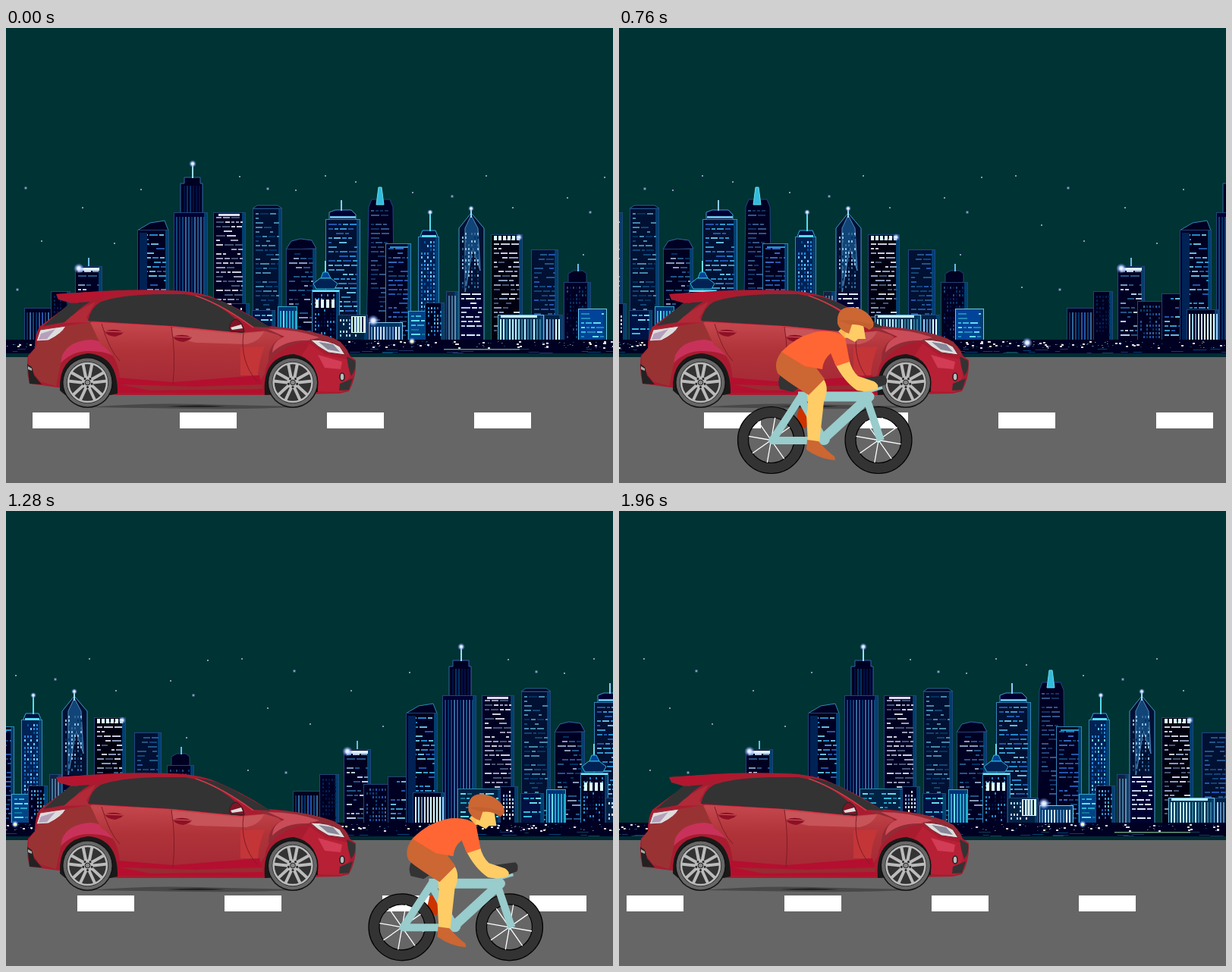
Recreate the animation shown at these times as an HTML page with a canvas. Size 800x600 px, loop 2000 ms.

```html
<!DOCTYPE html>
<html lang="en">
<head>
<meta charset="utf-8">
<title>Night ride</title>
<style>
html, body { margin: 0; width: 100%; height: 100%; overflow: hidden; background: #033; }
canvas, svg { position: absolute; left: 0; top: 0; width: 800px; height: 600px; display: block; }
svg { overflow: hidden; }
</style>
</head>
<body>
<canvas id="scene" width="800" height="600"></canvas>
<svg viewBox="0 0 800 600">
  <defs>
    <g id="rim">
      <circle r="33.5" fill="#111"/>
      <circle r="32" fill="#666"/>
      <circle r="27.5" fill="#222"/>
      <circle r="25.5" fill="#333" stroke="#bbb" stroke-width="2.5"/>
      <g id="spokes" stroke="#bbb" stroke-width="4"></g>
      <circle r="8" fill="#bbb"/>
      <g id="nuts" fill="#222"></g>
      <circle r="3.4" fill="#888" stroke="#222"/>
    </g>
    <g id="tyre">
      <circle r="37" fill="none" stroke="#333" stroke-width="14"/>
      <circle r="44" fill="none" stroke="#000" stroke-width="1.2"/>
      <circle r="30" fill="none" stroke="#000" stroke-width="1.2"/>
      <g class="wires" stroke="#fff" stroke-width="1.3"></g>
      <circle r="3" fill="#dff"/>
    </g>
    <linearGradient id="side" x1="0" y1="0" x2="0" y2="1">
      <stop offset="0" stop-color="#c4484d"/>
      <stop offset=".45" stop-color="#b03339"/>
      <stop offset="1" stop-color="#a52a36"/>
    </linearGradient>
  </defs>

  <g id="car">
    <path fill="#484848" d="M112 500Q180 494 255 496T392 499Q330 503 250 502T112 500Z"/>
    <path fill="#222" d="M212 499Q250 496 290 499Q250 501 212 499Z"/>
    <path fill="#a91c30" d="M66 351L110 348Q165 344 215 346Q245 346 270 354Q310 370 345 393Q395 396 432 409Q449 418 453 432L461 438Q462 462 452 479L440 482L340 484H147L76 475L31 469Q26 451 29 432L38 422Q38 404 44 394Q65 378 86 363L69 358Z"/>
    <path fill="#993333" d="M46 396L78 393L110 388L134 392L126 412Q90 414 73 438L66 472L45 466L30 446V433L40 420Z"/>
    <path fill="#c8325a" d="M74 432Q83 412 113 411Q142 415 151 440L147 437Q137 426 109 426Q87 426 72 442Z"/>
    <path fill="#333" d="M49 393L84 363L111 361Q94 370 82 387Z"/>
    <path fill="#b02a38" d="M76 389Q93 372 118 361L106 382L111 388Z"/>
    <path fill="url(#side)" d="M111 388L200 393L310 402L345 399Q372 407 365 423Q344 432 341 456L331 470L150 466Q150 432 125 418Z"/>
    <path fill="#c65458" d="M218 395L310 403L340 400Q335 413 317 417L250 415L220 408Z"/>
    <path fill="#c43538" d="M309 421L341 420Q333 440 332 458H309Z"/>
    <path fill="#b40f2f" d="M147 461L220 467L334 458L340 482L147 481Z"/>
    <path fill="#992b33" d="M150 470L250 473L338 470V476L190 478Z"/>
    <path fill="#333" d="M108 386Q112 368 125 361Q150 352 200 351H236Q258 354 272 363Q294 374 309 390L312 402L220 393Z"/>
    <path fill="#333" d="M250 352Q275 354 300 368L349 395L327 394Q285 367 250 354Z"/>
    <path fill="none" stroke="#d43a4a" stroke-width="1.5" d="M250 353Q285 365 326 395M113 388L220 394L310 403"/>
    <path fill="#b5152f" d="M66 351L112 348L160 347L115 357L92 363Z"/>
    <path fill="none" stroke="#811b28" stroke-width="1" d="M218 394Q224 430 220 470M126 390Q136 425 150 439M313 402Q308 440 331 466"/>
    <path fill="#922b36" d="M326 395L366 396Q413 399 441 414L452 430L424 428L400 413Q363 417 346 442Q344 416 366 407Z"/>
    <path fill="#ca4c58" d="M345 397Q382 397 413 408L398 412Q367 411 351 428Q352 412 367 407Z"/>
    <path fill="#b82036" d="M400 416L421 431L450 437L453 459L443 480L411 479Q411 444 390 432Z"/>
    <path fill="#d23c55" d="M411 431L443 440L441 450L420 448Z"/>
    <path fill="#ddd" stroke="#811b28" d="M401 411Q426 411 440 420L447 431L425 428Q411 421 401 411Z"/>
    <path fill="#889" d="M412 414L431 417L440 427L424 424Z"/>
    <path fill="#333" d="M449 433L460 439Q462 450 455 459L451 446Z"/>
    <path fill="#333" d="M440 469L457 462L452 477L439 478Z"/>
    <ellipse cx="443" cy="460" rx="3" ry="5" fill="#bbb" stroke="#222" stroke-width="1.5"/>
    <path fill="#ddd" stroke="#9b2436" d="M40 413L45 398L79 393Q74 403 56 412Z"/>
    <path fill="#b5a0bb" d="M46 403L65 397L54 410L43 411Z"/>
    <path fill="#222" d="M28 443L34 447L37 458L47 470L31 469Z"/>
    <path fill="#aaa" d="M29 446L34 449V452L29 450Z"/>
    <g fill="#8d1025">
      <path id="handle" d="M130 400Q143 395 155 401L152 404L144 407Q133 406 130 400Z"/>
      <use href="#handle" x="90" y="7"/>
    </g>
    <path stroke="#d45a60" d="M131 400L154 401M221 407L244 408"/>
    <path fill="#801425" stroke="#222" d="M294 396Q296 384 304 384Q313 389 314 401L296 400Z"/>
    <path fill="#ddd" d="M296 395L310 391L312 396L298 398Z"/>
    <path fill="#191919" d="M71 478Q69 433 108 429Q148 432 147 482L138 484H78Z"/>
    <path fill="#191919" d="M341 484Q337 433 379 430Q414 436 411 480Z"/>
    <use href="#rim" x="107.5" y="467.5"/>
    <use href="#rim" x="378" y="467.5"/>
  </g>

  <g id="bike">
    <path fill="#cc3300" d="M237 502L246 500L251 514L246 528L232 524Z"/>
    <use href="#tyre" x="200.5" y="543.5"/>
    <use href="#tyre" x="342" y="543.5"/>
    <g fill="none" stroke="#99cccc" stroke-linejoin="round">
      <path stroke-width="13" d="M236 486H330L270 541"/>
      <path stroke-width="10" d="M241 484L202 544H274M238 486L270 543M324 482L345 544"/>
      <path stroke-width="4" d="M320 482L347 474"/>
    </g>
    <circle cx="270" cy="542" r="8" fill="#99cccc"/>
    <path fill="#333" d="M213 457L234 461L238 474L229 480L212 476Q208 466 213 457Z"/>
    <path fill="#333" d="M320 462L350 458Q355 462 352 470L341 474L318 471Z"/>
    <path fill="#ffcc66" d="M247 479L269 462Q278 474 270 493L264 547H249L247 510Q251 497 247 479Z"/>
    <path fill="#cc6633" d="M248 543L263 545Q274 558 284 565L285 570Q265 569 247 556Z"/>
    <path fill="#cc6633" d="M214 427Q203 442 209 455Q215 462 250 484L271 463L262 451L250 434Z"/>
    <path fill="#ffcc66" d="M284 441L303 437Q307 452 315 459L336 466Q343 470 341 476Q329 481 314 478Q296 466 284 441Z"/>
    <path fill="#ff6633" d="M214 427Q235 405 264 400Q286 398 298 408L304 440L286 446L279 429Q269 437 268 450L245 446Z"/>
    <path fill="#ffbb55" d="M289 400L301 389L313 405L298 409Z"/>
    <path fill="#ffcc66" d="M300 391L322 391L325 410L315 410L311 414L298 407Z"/>
    <path fill="#cc6633" d="M288 390Q286 369 304 368Q321 368 331 380Q337 388 335 394L330 398Q320 390 307 391L303 403Q291 399 288 390Z"/>
    <path fill="#b95a2c" d="M289 386Q306 383 334 391L330 398Q318 389 304 391Z" opacity=".45"/>
  </g>
</svg>
<script>
const LOOP = 2000, STEP = 40;
const TILE = 877, SCROLL = 0.4087;
const ctx = document.getElementById('scene').getContext('2d');
const bike = document.getElementById('bike');

const rays = (n, start, make) =>
  Array.from({ length: n }, (_, i) => make(start + i * 360 / n)).join('');

document.getElementById('spokes').innerHTML = rays(5, 0, a =>
  `<path transform="rotate(${a})" d="M-2-5L-6-25M2-5L6-25"/>`);
document.getElementById('nuts').innerHTML = rays(5, 36, a =>
  `<circle transform="rotate(${a})" cy="-6" r="1.5"/>`);
document.querySelector('.wires').innerHTML = rays(8, 10, a =>
  `<path transform="rotate(${a})" d="M0 0V-30"/>`);

let seed = 7;
function rnd() {
  seed = (seed * 16807) % 2147483647;
  return seed / 2147483647;
}
const pick = list => list[Math.floor(rnd() * list.length)];

const city = document.createElement('canvas');
city.width = TILE;
city.height = 440;
const c = city.getContext('2d');
const GROUND = 413;

function box(color, x, y, w, h) {
  c.fillStyle = color;
  c.fillRect(x, y, w, h);
}

function shape(color, edge, ...pts) {
  c.beginPath();
  for (let i = 0; i < pts.length; i += 2) c.lineTo(pts[i], pts[i + 1]);
  c.closePath();
  c.fillStyle = color;
  c.fill();
  c.strokeStyle = edge;
  c.stroke();
}

function glow(x, y, r) {
  const g = c.createRadialGradient(x, y, 0, x, y, r);
  g.addColorStop(0, '#fff');
  g.addColorStop(0.35, '#cdf');
  g.addColorStop(1, 'rgba(80,120,220,0)');
  c.fillStyle = g;
  c.fillRect(x - r, y - r, r * 2, r * 2);
}

const DIM = ['#036', '#147', '#25a', '#369'];
const MID = ['#25a', '#28c', '#39c', '#6bd'];
const PALE = ['#9cf', '#cde', '#dff', '#58b'];
const AQUA = ['#2ac', '#3bd', '#6de', '#179'];

// kind: r = rows, s = vertical stripes, d = scattered panes
function windows(kind, colors, x, y, w, h) {
  if (kind === 's') {
    for (let i = 3; i < w - 2; i += 4) box(pick(colors), x + i, y, 2, h);
    return;
  }
  const rowGap = kind === 'r' ? 6 : 5;
  for (let j = 0; j < h - 3; j += rowGap) {
    for (let i = 4; i < w - 5;) {
      const len = kind === 'r' ? 4 + Math.floor(rnd() * 9) : 2;
      if (rnd() < 0.72) box(pick(colors), x + i, y + j, Math.min(len, w - 4 - i), kind === 'r' ? 2 : 3);
      i += len + 2;
    }
  }
}

function block(x, right, top, kind, colors, fill = '#002', edge = '#247') {
  const w = right - x;
  box(fill, x, top, w, GROUND - top);
  box('#003f70', right - 5, top, 4, GROUND - top);
  windows(kind, colors, x, top + 6, w, GROUND - top - 8);
  c.strokeStyle = edge;
  c.strokeRect(x + 0.5, top + 0.5, w - 1, GROUND - top);
}

function mast(x, top, bottom, color = '#6be') {
  box(color, x - 1, top, 2, bottom - top);
}

function drawStars() {
  const spots = [26, 211, 101, 237, 178, 213, 47, 281, 143, 284, 15, 345, 308, 196, 421, 195,
    382, 214, 536, 217, 588, 222, 633, 195, 668, 237, 740, 224, 789, 197, 770, 243,
    834, 195, 868, 260, 761, 299, 842, 342, 345, 212, 461, 203];
  for (let i = 0; i < spots.length; i += 2) {
    const r = i % 5 ? 1 : 1.5;
    box('#748ab5', spots[i] - r, spots[i + 1] - r, r * 2, r * 2);
    box('#c8c8ee', spots[i] - 0.5, spots[i + 1] - 0.5, 1, 1);
  }
}

function drawTall() {
  block(24, 64, 369, 's', DIM);
  block(59, 85, 347, 'd', ['#014', '#025']);
  block(91, 127, 314, 'r', ['#79b', '#258', '#bce']);
  box('#def', 95, 316, 28, 4);
  mast(109, 303, 314);
  glow(96, 317, 7);
  block(117, 156, 360, 'd', DIM);
  block(149, 188, 350, 'r', MID);
  shape('#002', '#38b', 173, 267, 190, 257, 209, 254, 214, 267);
  block(173, 215, 266, 'r', MID);
  box('#025', 176, 270, 10, 143);

  shape('#002', '#36a', 230, 245, 230, 205, 235, 205, 235, 197, 256, 197, 256, 205, 259, 205, 259, 245);
  windows('s', ['#014', '#036'], 231, 208, 28, 35);
  block(221, 266, 243, 's', ['#258', '#036', '#369', '#147'], '#003');
  mast(246, 180, 198, '#9df');
  glow(246, 179, 5);

  block(273, 316, 243, 'r', ['#99b', '#ccd', '#457']);
  box('#dde', 280, 245, 28, 3);
  shape('#002', '#269', 325, 238, 331, 234, 358, 234, 364, 238);
  block(325, 364, 238, 'r', ['#036', '#147', '#48a'], '#013');
  shape('#002', '#36a', 369, 292, 376, 281, 388, 278, 403, 280, 409, 291);
  block(369, 409, 291, 'r', ['#258', '#89b', '#036']);
  shape('#003', '#49c', 426, 254, 426, 243, 434, 240, 455, 240, 461, 246, 461, 254);
  block(421, 467, 252, 'r', MID, '#013', '#38b');
  box('#6bd', 427, 248, 34, 3);
  mast(442, 227, 241, '#8cf');
  shape('#002', '#248', 475, 412, 478, 236, 482, 226, 506, 226, 510, 236, 512, 412);
  windows('r', ['#247', '#136', '#358'], 477, 240, 34, 170);
  shape('#3bd', '#6de', 488, 233, 491, 210, 495, 210, 498, 233);
  block(500, 534, 284, 'r', ['#25a', '#36b', '#147'], '#002', '#38b');
  box('#29c', 506, 288, 24, 2);
  shape('#014', '#3ad', 545, 277, 549, 267, 566, 267, 570, 277);
  block(543, 571, 275, 'd', ['#28d', '#05a', '#6cf'], '#025', '#38b');
  box('#5de', 548, 273, 19, 3);
  mast(559, 241, 268, '#5de');
  glow(559, 243, 4);

  shape('#013', '#49c', 597, 412, 597, 264, 613, 244, 630, 264, 630, 412);
  shape('#147', '#58b', 605, 350, 605, 264, 613, 247, 622, 264, 625, 320, 615, 290);
  windows('d', ['#036', '#369', '#8bd'], 597, 270, 33, 76);
  mast(613, 238, 250, '#9df');
  glow(613, 238, 4);
  block(639, 681, 272, 'r', ['#89b', '#ccd', '#457'], '#001');
  for (let x = 643; x < 678; x += 6) box('#dff', x, 274, 4, 6);
  glow(676, 276, 5);
  block(692, 728, 292, 'r', ['#258', '#147', '#25a'], '#013', '#248');
  shape('#002', '#247', 741, 336, 741, 324, 748, 320, 760, 320, 765, 324, 765, 336);
  mast(754, 311, 321);
  block(735, 771, 335, 'd', ['#014', '#247', '#036']);
}

function drawLow() {
  block(182, 224, 371, 's', PALE);
  block(241, 299, 366, 'r', AQUA, '#024', '#28a');
  block(297, 321, 363, 'd', PALE);
  block(324, 355, 372, 'r', AQUA, '#014');
  block(358, 384, 367, 's', AQUA, '#037', '#3ac');

  mast(421, 307, 324, '#6de');
  shape('#049', '#3bd', 415, 330, 418, 322, 424, 322, 428, 330);
  shape('#025', '#3bd', 409, 344, 405, 337, 414, 330, 428, 330, 437, 337, 433, 344);
  block(403, 440, 345, 'd', ['#28c', '#014'], '#002', '#38b');
  box('#7ef', 404, 346, 35, 2);
  for (let x = 408; x < 435; x += 7) box('#dff', x, 358, 4, 11);
  block(436, 477, 378, 'd', PALE, '#024');
  box('#dfe', 455, 380, 19, 22);
  windows('s', ['#024', '#68a'], 454, 381, 21, 20);
  block(478, 523, 388, 's', PALE, '#036', '#8ce');
  glow(484, 386, 8);
  block(530, 557, 373, 'r', AQUA, '#048', '#3ac');
  block(552, 578, 362, 'd', MID, '#002');
  block(580, 596, 347, 's', ['#68a', '#479'], '#124');
  box('#003', 598, 348, 31, 65);
  windows('r', ['#def', '#bce'], 596, 350, 35, 62);
  block(648, 709, 378, 's', ['#8cd', '#bef', '#379'], '#035', '#6bd');
  box('#bef', 652, 379, 48, 3);
  block(709, 734, 378, 's', PALE, '#024');
  block(754, 792, 370, 'r', ['#3bd', '#28b', '#6de'], '#049', '#6ce');
}

function drawShore() {
  box('#002', 0, 411, TILE, 23);
  box('#012a33', 0, 429, TILE, 5);
  for (let i = 0; i < 240; i++) {
    const bright = rnd() < 0.35;
    const size = bright ? 2 : 1;
    box(bright ? '#dde' : pick(['#369', '#88a', '#147']), Math.floor(rnd() * TILE), 413 + Math.floor(rnd() * 9), size * 1.5, size);
  }
  for (let i = 0; i < 50; i++) box(pick(['#145', '#047', '#236']), rnd() * TILE, 423 + Math.floor(rnd() * 6), 5 + rnd() * 16, 1);
  box('#697', 577, 423, 100, 1.5);
  glow(849, 415, 7);
  glow(535, 413, 5);
  box('#ffb', 533, 412, 4, 3);
}

drawStars();
drawTall();
drawLow();
drawShore();

function draw(t) {
  const shift = t * SCROLL;
  ctx.fillStyle = '#033';
  ctx.fillRect(0, 0, 800, 434);
  const x = -Math.round(shift);
  ctx.drawImage(city, x, 0);
  ctx.drawImage(city, x + TILE, 0);
  ctx.fillStyle = '#666';
  ctx.fillRect(0, 434, 800, 166);
  ctx.fillStyle = '#fff';
  for (let i = 0; i < 10; i++) {
    const start = 35 + 194 * i + (i > 4 ? 14 : 0);
    ctx.fillRect(Math.round(start - shift), 507, 75, 21);
  }
  const dx = 0.6182 * (t - 760), dy = 0.0102 * (t - 760);
  bike.setAttribute('transform', `translate(${dx.toFixed(2)} ${dy.toFixed(2)})`);
}

function tick() {
  const t = performance.now() % LOOP;
  draw(Math.floor(t / STEP) * STEP);
  requestAnimationFrame(tick);
}
tick();
</script>
</body>
</html>
```
